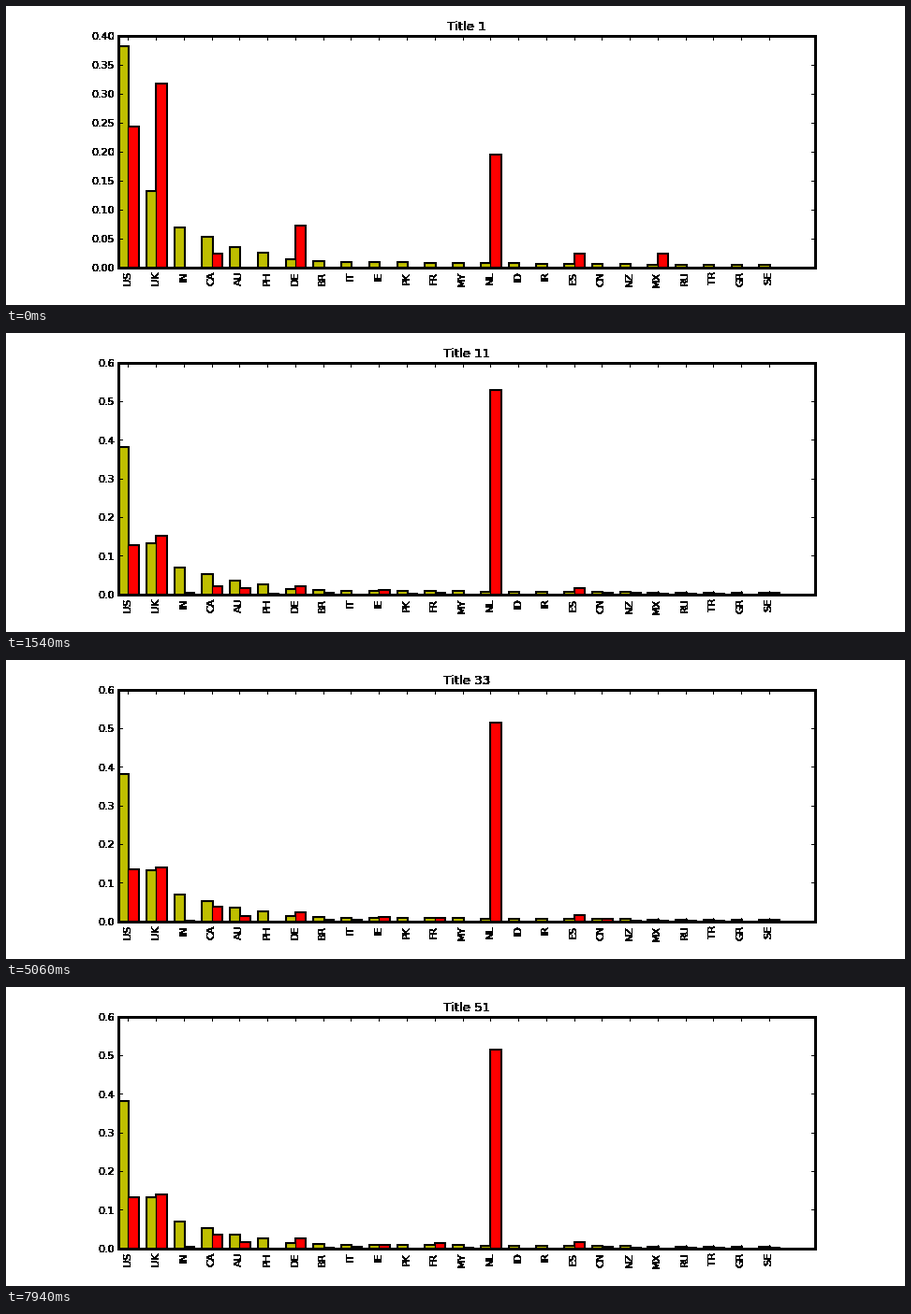
A matplotlib script that plays this animation: 960 px wide and 320 px high, repeating every 8 s.

```python
import math

import matplotlib.pyplot as plt
import numpy as np
from matplotlib.animation import FuncAnimation
from matplotlib.collections import LineCollection, PolyCollection
from matplotlib.patches import Rectangle

W, H, DPI = 960, 320, 80
LEFT, RIGHT, TOP, BASE = 120, 864, 32, 280
UNIT = (RIGHT - LEFT) / 25
BAR = 0.35 * UNIT
PX = 72 / DPI
TICK = 4.4
STEP_MS, LOOP_MS = 20, 8000

CODES = ("US UK IN CA AU PH DE BR IT IE PK FR "
         "MY NL ID IR ES CN NZ MX RU TR GR SE").split()

# Shares in thousandths
FIXED = [382, 132, 70, 53, 36, 26, 14.5, 11.5, 10, 10, 9.5, 8.5,
         8.5, 8, 8, 6.8, 6.5, 6.5, 6.5, 5, 5, 5, 5, 5]
KEYS = {
    1: dict(US=244, UK=318, CA=24.4, DE=73, NL=195, ES=24.4, MX=24.4),
    5: dict(US=184, UK=258, IN=12, CA=20, AU=20, PH=4, DE=42, BR=4, IE=8,
            PK=4, FR=12, NL=323, ES=23, CN=4, MX=4, RU=4, SE=12),
    11: dict(US=128, UK=153, IN=5, CA=22, AU=17, PH=2, DE=22, BR=4, IE=12,
             PK=3, FR=5, NL=530, ES=17, CN=5, NZ=4, MX=3, RU=3, TR=2, SE=5),
    25: dict(US=131, UK=136, IN=3, CA=36, AU=15, DE=24, BR=3, IT=5, IE=12,
             FR=10, NL=530, ES=15, CN=8, NZ=3, MX=3, RU=3, SE=5),
    33: dict(US=136, UK=141, IN=3, CA=39, AU=14, DE=24, BR=5, IT=5, IE=12,
             FR=10, NL=516, ES=18, CN=8, NZ=3, MX=3, RU=3, TR=2, SE=5),
    42: dict(US=143, UK=138, IN=3, CA=39, AU=14, DE=27, BR=3, IT=5, IE=12,
             FR=13, NL=516, ES=20, CN=5, NZ=3, MX=3, RU=3, TR=2, SE=5),
    51: dict(US=133, UK=141, IN=5, CA=36, AU=17, DE=27, BR=3, IT=5, IE=10,
             FR=15, MY=3, NL=516, ES=18, CN=5, NZ=3, RU=3, TR=2, SE=3),
}

plt.rcParams["font.family"] = "DejaVu Sans"
fig = plt.figure(figsize=(W / DPI, H / DPI), dpi=DPI, facecolor="white")


def pixel_axes(name):
    axes = fig.add_axes([0, 0, 1, 1], label=name)
    axes.set(xlim=(0, W), ylim=(H, 0))
    axes.axis("off")
    return axes


def harden(img, dpi):
    """Turn every touched text pixel solid black."""
    solid = np.zeros_like(img)
    solid[..., 3] = img[..., 3] > 0.04
    return solid, 0, 0


ax = pixel_axes("chart")
words = pixel_axes("words")
words.set_agg_filter(harden)


def add_lines(shape):
    shape.set_snap(False)
    return ax.add_collection(shape, autolim=False)


def bars(color, width, z):
    return add_lines(PolyCollection([], facecolors=color, edgecolors="black",
                                    linewidths=width, joinstyle="miter",
                                    zorder=z))


def tick_lines():
    return add_lines(LineCollection([], colors="black", linewidths=PX,
                                    zorder=4))


halos = bars("black", 0, 0)
fixed_bars = bars((0.75, 0.75, 0), 1, 1)
moving_bars = bars((1, 0, 0), 1, 2)
x_ticks, y_ticks = tick_lines(), tick_lines()
ax.add_patch(Rectangle((LEFT + 0.5, TOP + 0.5), RIGHT - LEFT, BASE - TOP,
                       fill=False, ec="black", lw=3 * PX, snap=False, zorder=5))

marks = []
for k, code in enumerate(CODES):
    x = LEFT + k * UNIT + BAR
    words.text(x - 0.5, BASE + 3.5, code, size=10, rotation=90,
               ha="center", va="top")
    col = round(x) + 0.5
    marks += [[(col, TOP), (col, TOP + 5)], [(col, BASE - 4), (col, BASE)]]
x_ticks.set_segments(marks)

title = words.text((LEFT + RIGHT) / 2, TOP - 5.5, "", size=12, ha="center")
y_labels = [words.text(LEFT - TICK, BASE, "", size=10, ha="right",
                       va="center_baseline") for _ in range(10)]


def shares(n):
    """Moving shares at count n, eased between the key counts."""
    stops = list(KEYS)
    a, b = next((a, b) for a, b in zip(stops, stops[1:]) if n <= b)
    p = (n - a) / (b - a)
    if a == 5:
        p **= 1.6
    return [KEYS[a].get(c, 0) * (1 - p) + KEYS[b].get(c, 0) * p for c in CODES]


def spans(values, shift, scale):
    """Pixel column and row limits (left, top, right) of each bar."""
    starts = [LEFT + k * UNIT + shift for k in range(len(values))]
    return [(round(x), round(BASE - v * scale), round(x + BAR))
            for x, v in zip(starts, values)]


def box(x0, y, x1):
    return [(x0, BASE), (x0, y), (x1, y), (x1, BASE)]


def outline(bar):
    return box(*(v + 0.5 for v in bar))


def halo(bar):
    x0, y, x1 = bar
    return box(x0 - 1, y - 1, x1 + 2)


def draw_scale(limit, step):
    count = round(limit / step)
    digits = 2 if step < 100 else 1
    segs = []
    for k, label in enumerate(y_labels):
        y = BASE - (BASE - TOP) * k / count
        label.set_visible(k <= count)
        label.set_y(y)
        label.set_text(f"{k * step / 1000:.{digits}f}")
        if k <= count:
            row = math.floor(y) + 0.5
            segs += [[(LEFT, row), (LEFT + 5, row)],
                     [(RIGHT - 4, row), (RIGHT, row)]]
    y_ticks.set_segments(segs)


def count_at(ms):
    n = 1 if ms < 100 else 2 + (ms - 100) // 160
    return 29 if n == 30 else n  # 29 holds for two beats


def draw(i):
    n = count_at(i * STEP_MS)
    moving = shares(n)
    peak = max(FIXED + moving)
    step = 50 if peak <= 450 else 100
    limit = math.ceil(peak / step) * step
    scale = (BASE - TOP) / limit
    left, right = spans(FIXED, 0, scale), spans(moving, BAR, scale)
    halos.set_verts([halo(b) for b in left + right])
    fixed_bars.set_verts([outline(b) for b in left])
    moving_bars.set_verts([outline(b) for b in right])
    draw_scale(limit, step)
    title.set_text(f"Title {n}")
    return []


anim = FuncAnimation(fig, draw, frames=LOOP_MS // STEP_MS, interval=STEP_MS,
                     init_func=lambda: draw(0), repeat=True, repeat_delay=0,
                     blit=False)
plt.show()
```
